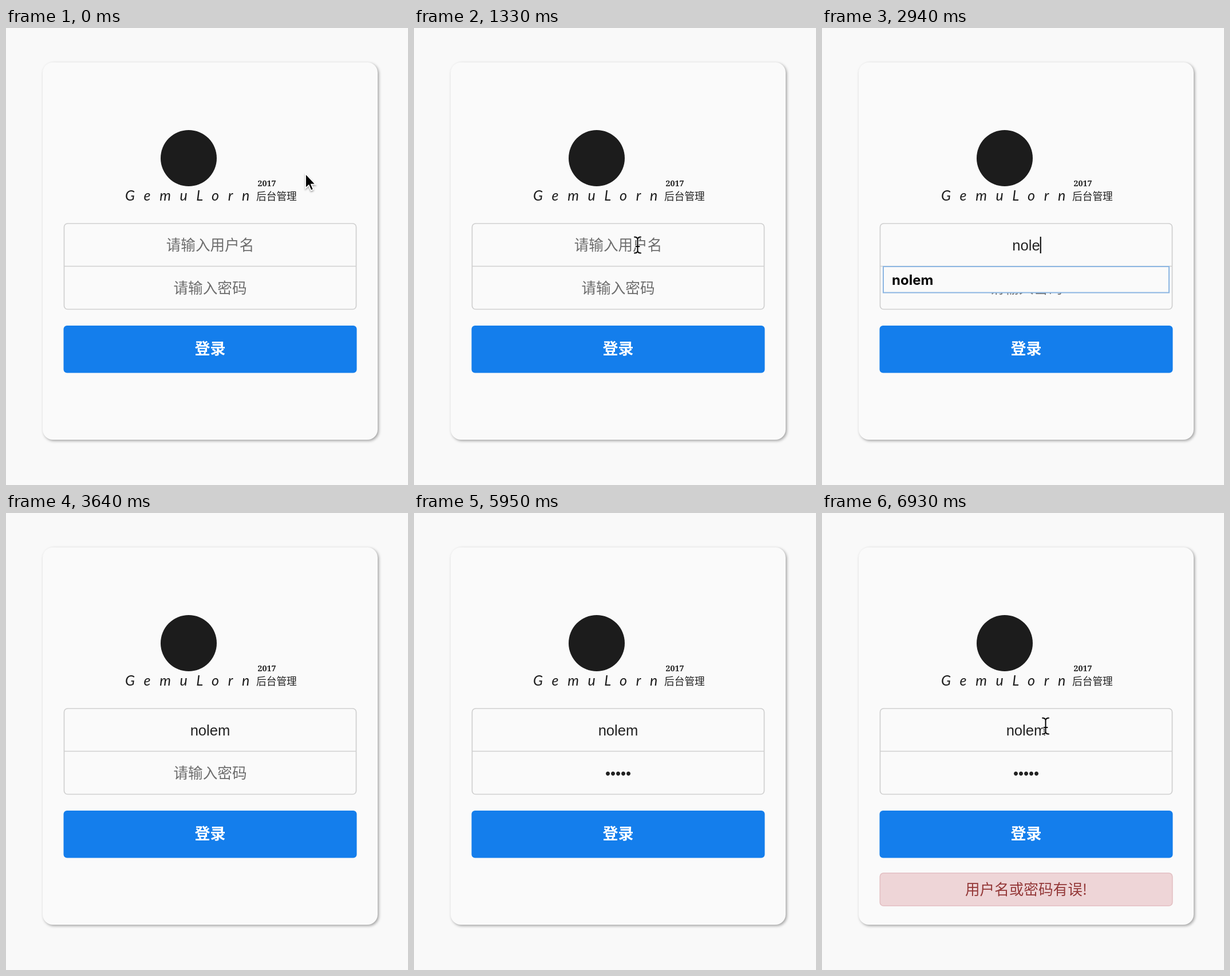
Recreate the animation shown at these times as an HTML page. Size 702x797 px, loop 7 s.

```html
<!DOCTYPE html>
<html lang="zh-CN">
<head>
<meta charset="utf-8">
<title>登录</title>
<style>
  html, body { margin: 0; width: 100%; height: 100%; overflow: hidden; background: #f9f9f9; }
  svg { display: block; width: 702px; height: 797px; }
  text { font: 25.6px "Liberation Sans", "Noto Sans CJK SC", "Noto Sans CJK", sans-serif; fill: #222; }
  .mid { text-anchor: middle; }
  .zh { font-family: "Noto Sans CJK SC", "Noto Sans CJK", sans-serif; }
  .hint { fill: #6d6d6d; }
  .brand { font: italic 25px Lato, sans-serif; letter-spacing: 15.7px; fill: #1c1c1c; }
  .year { font: 600 14.3px "Noto Serif", serif; }
  .sub { font-size: 17.7px; font-weight: 300; }
  .submit { font-size: 27px; font-weight: 700; fill: #fff; }
  .option { font: 700 24px Inter, sans-serif; fill: #000; }
  .error { fill: #943838; }
  .card { filter: drop-shadow(2px 2px 2.5px rgba(0, 0, 0, .36)); }
  #arrow { filter: drop-shadow(0 2px 1.5px rgba(0, 0, 0, .35)); }
</style>
</head>
<body>
<svg viewBox="0 0 702 797">
  <rect class="card" x="64" y="60" width="585" height="658" rx="18" fill="#fafafa"/>

  <circle cx="319" cy="227" r="49" fill="#1c1c1c"/>
  <text class="brand" x="208" y="301">GemuLorn</text>
  <text class="year" x="439.5" y="276">2017</text>
  <text class="zh sub" x="437" y="300">后台管理</text>

  <g fill="none" stroke="#cfcfcf" stroke-width="1.7">
    <rect x="101.5" y="341" width="510" height="149.5" rx="6"/>
    <path d="M102 415.5H611"/>
  </g>
  <text id="userHint" class="zh hint mid" x="356.5" y="388">请输入用户名</text>
  <text id="passHint" class="zh hint mid" x="356.5" y="463">请输入密码</text>
  <text id="user" class="mid" x="356.5" y="388"></text>
  <text id="pass" class="mid" x="356.5" y="463"></text>

  <g id="popup">
    <rect x="107" y="416" width="499" height="45.5" fill="#fafafa" stroke="#8cb6e2" stroke-width="2"/>
    <text class="option" x="122" y="448">nolem</text>
  </g>
  <rect id="caret" width="2" height="29" fill="#000"/>

  <rect x="100.5" y="519" width="512" height="82.5" rx="6" fill="#147eec"/>
  <text class="zh submit mid" x="356.5" y="569">登录</text>

  <g id="alert">
    <rect x="101.3" y="628" width="510.5" height="57" rx="6" fill="#eed5d7" stroke="#e3bfc2" stroke-width="1.6"/>
    <text class="zh error mid" x="356.5" y="666">用户名或密码有误!</text>
  </g>

  <path id="arrow" d="M0 0V25.5L5.7 20.2L9.6 29.4L13.8 27.6L10 18.6H17.6Z"
        fill="#000" stroke="#fff" stroke-width="1.8"/>
  <g id="beam" fill="none" stroke-linecap="round">
    <path id="beamShape" stroke="#fff" stroke-width="4"
          d="M-5.5-14Q0-14 0-9.5Q0-14 5.5-14M0-9.5V9.5M-5.5 14Q0 14 0 9.5Q0 14 5.5 14M-3 2.5H3"/>
    <use href="#beamShape"/>
    <path id="beamInk" stroke="#000" stroke-width="2"/>
  </g>
</svg>
<script>
const LOOP = 7000, TICK = 70, BLINK = 490;
const USER = "nolem", CENTER = 356.5, USER_CHAR = 14.2, DOT = 8.96;
const USER_KEYS = [2450, 2590, 2730, 2870, 3010];
const PASS_KEYS = [4410, 4620, 4830, 5040, 5250];
const FOCUS = 840, TAB = 3150, ENTER = 5740, ALERT = 6020, WAKE = 6510;

const $ = id => document.getElementById(id);
const show = (id, on) => $(id).style.display = on ? "" : "none";
const place = (id, x, y) => $(id).setAttribute("transform", `translate(${x} ${y})`);
const ease = p => { p = Math.min(1, Math.max(0, p)); return p * p * (3 - 2 * p); };
const typed = (keys, t) => keys.filter(k => k <= t).length;

$("beamInk").setAttribute("d", $("beamShape").getAttribute("d"));
document.querySelector("#beam use").remove();

function drawPointer(t) {
  const p = ease((t - 70) / 700);
  const x = 523 + (390.5 - 523) * p;
  const y = 254 + (378.5 - 254) * p;
  const overField = y > 340;
  show("arrow", !overField);
  show("beam", overField && t < USER_KEYS[0] || t >= WAKE);
  place("arrow", x, y);
  place("beam", x, y - 7 * ease((t - WAKE) / 350));
}

function drawCaret(t, userCount, passCount) {
  const inPass = t >= TAB;
  const lastKey = [FOCUS, ...USER_KEYS, TAB, ...PASS_KEYS].filter(k => k <= t).pop();
  const lit = Math.floor((t - lastKey) / BLINK) % 2 === 0;
  const half = inPass ? passCount * DOT / 2 : USER.slice(0, userCount) ? $("user").getComputedTextLength() / 2 : 0;
  show("caret", t >= FOCUS && t < ENTER && lit);
  place("caret", CENTER + half, inPass ? 439 : 364);
}

function draw(t) {
  const userCount = typed(USER_KEYS, t), passCount = typed(PASS_KEYS, t);
  $("user").textContent = USER.slice(0, userCount);
  $("pass").textContent = "•".repeat(passCount);
  show("userHint", !userCount);
  show("passHint", !passCount);
  show("popup", userCount && t < TAB);
  show("alert", t >= ALERT);
  drawCaret(t, userCount, passCount);
  drawPointer(t);
}

function frame() {
  const t = performance.now() % LOOP;
  draw(Math.floor(t / TICK) * TICK);
  requestAnimationFrame(frame);
}
frame();
</script>
</body>
</html>
```
